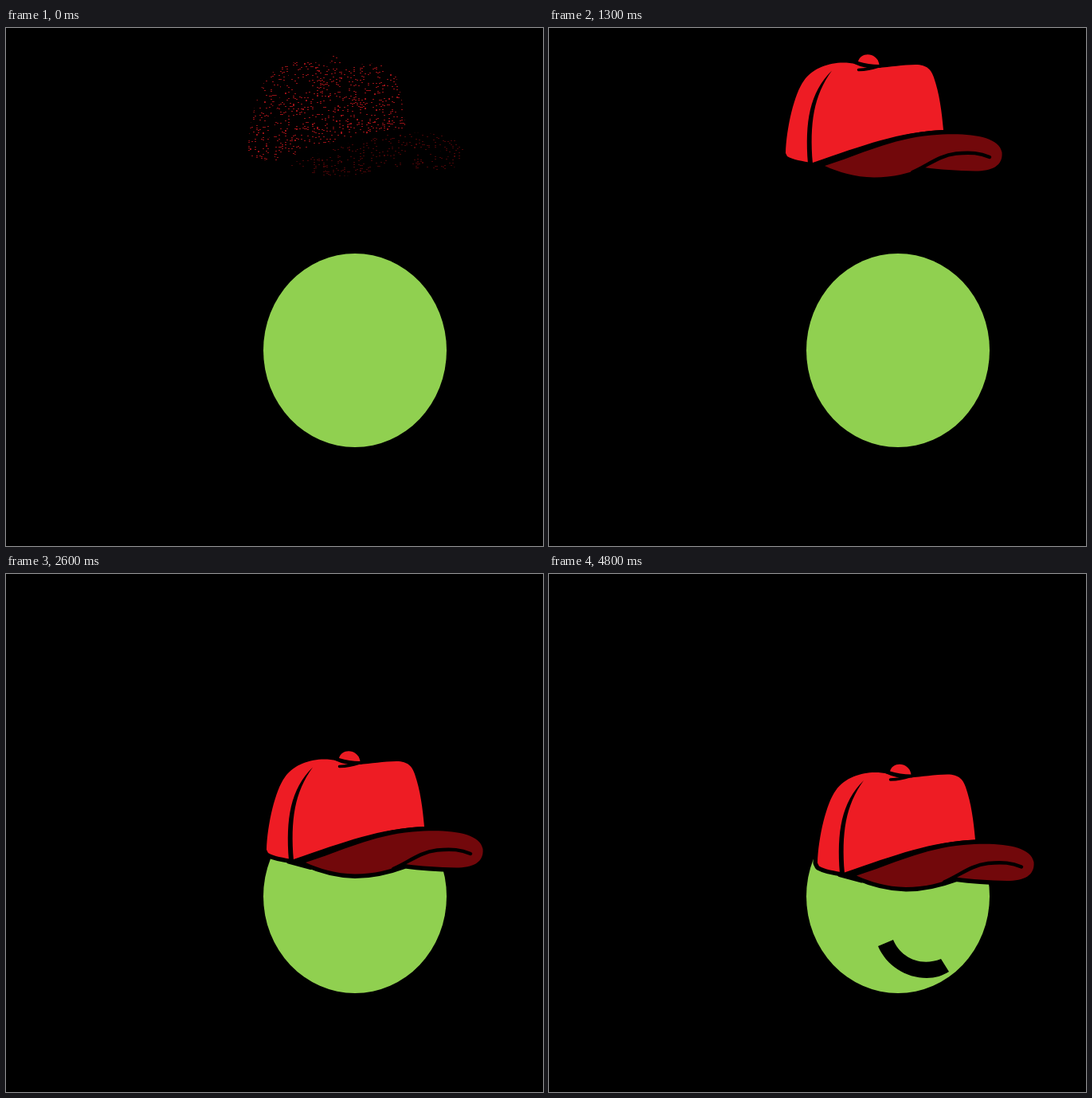
Recreate the animation shown at these times as an HTML page with a canvas. Size 674 px wide and 650 px high, loop 5 s.

```html
<!DOCTYPE html>
<html lang="en">
<head>
<meta charset="utf-8">
<title>Cap and smile</title>
<style>
html, body { margin: 0; width: 100%; height: 100%; overflow: hidden; background: #000; }
canvas { display: block; width: 674px; height: 650px; }
</style>
</head>
<body>
<canvas id="stage" width="674" height="650"></canvas>
<script>
const LOOP = 5000, STEP = 100;
const RED = '#ee1c24', DARK = '#72080b', GREEN = '#90d050';
const ctx = document.getElementById('stage').getContext('2d', { willReadFrequently: true });

const crown = new Path2D('M297 157 C298 125 308 82 320 66 C331 50 352 43.5 369 43.5 C381 43.5 390 46 399 49.5 ' +
  'L413 50 C428 49 444 46 460 46 C475 46 480 53 483 62 C490 82 493 105 495 128 ' +
  'C440 130 395 147 331 169 C318 167.5 306 165 299 161 Z');
const brim = new Path2D('M346 173 C390 159 430 139 480 134.5 C525 131 564 135 568.5 156 ' +
  'C570 173 556 179.5 535 179.5 C512 179 490 177.5 471 175 C452 182 432 187.5 408 187.5 C383 187 364 181 346 173 Z');
const button = new Path2D('M388 42 C391 29.5 412 30 414.5 46 C405 46 397 44.5 388 42 Z');
const seam = new Path2D('M355 53.5 C327 81 321 118 325 170 L331 170 C327 120 332 85 355 53.5 Z');
const fold = new Path2D('M456 181 C475 173 489 160 511 157.5 C530 155.5 541 157 553 162');
const crease = new Path2D('M388.5 52.5 Q402 52 412 48.5 M384 43.5 Q396 49 409 49.5');
const hem = new Path2D('M326 171 L352 178');
const mouth = new Path2D('M413 467 C423 491 448 507 474 507 C485 507 494 504 502 499 ' +
  'L492 483 C464 494 440 479 432 459 Z');

// time, x and y of the cap relative to its drawn place
const moves = [
  [0, 6.5, -1.5], [1100, 6.5, -1.5], [1300, 0, 0], [1500, -85, 27], [1600, -130, 55],
  [1700, -159, 80], [1800, -138, 80], [1900, -138, 80], [2000, -76, 96], [2200, 52, 137],
  [2300, 50, 153], [2400, 45, 167], [2500, 38, 179], [2600, 30, 189], [2700, 30, 197],
  [2800, 34, 203], [2900, 38, 205], [3000, 40, 205.5], [LOOP, 40, 205.5]
];

function capPlace(t) {
  const i = moves.findIndex(m => m[0] > t);
  const [t0, x0, y0] = moves[i - 1], [t1, x1, y1] = moves[i];
  const k = (t - t0) / (t1 - t0);
  return [x0 + (x1 - x0) * k, y0 + (y1 - y0) * k];
}

function strokeLine(path, width) {
  ctx.lineWidth = width;
  ctx.stroke(path);
}

function drawCap(x, y) {
  ctx.save();
  ctx.translate(x, y);
  ctx.strokeStyle = '#000';
  ctx.lineCap = ctx.lineJoin = 'round';
  strokeLine(hem, 8);
  [[crown, RED, 11], [button, RED, 8], [brim, DARK, 11]].forEach(([path, color, width]) => {
    strokeLine(path, width);
    ctx.fillStyle = color;
    ctx.fill(path);
  });
  ctx.fillStyle = '#000';
  ctx.fill(seam);
  strokeLine(fold, 4.5);
  strokeLine(crease, 3.5);
  ctx.restore();
}

function noise(x, y) {
  let h = Math.imul(x + 1, 374761393) ^ Math.imul(y + 1, 668265263);
  h = Math.imul(h ^ (h >>> 13), 1274126177);
  h = Math.imul(h ^ (h >>> 16), 2246822519);
  return ((h ^ (h >>> 15)) >>> 0) / 4294967296;
}

// dim random dashes of the area holding the cap
function dissolve(shown) {
  const x = 290, y = 22, w = 300, h = 180;
  const image = ctx.getImageData(x, y, w, h), data = image.data;
  const bright = 0.6 + 0.4 * shown, dim = 0.4 * shown * shown;
  for (let i = 0; i < w * h; i++) {
    const visible = noise((i % w) >> 1, Math.floor(i / w)) < shown;
    for (let c = 0; c < 3; c++) data[i * 4 + c] *= visible ? bright : dim;
  }
  ctx.putImageData(image, x, y);
}

function draw(t) {
  ctx.fillStyle = '#000';
  ctx.fillRect(0, 0, 674, 650);
  ctx.fillStyle = GREEN;
  ctx.beginPath();
  ctx.ellipse(438, 404.5, 115, 121.5, 0, 0, Math.PI * 2);
  ctx.fill();
  drawCap(...capPlace(t));
  const shown = 0.08 + t / 900;
  if (shown < 1) dissolve(shown);
  if (t >= 3500) {
    ctx.globalAlpha = Math.min(1, (t - 3400) / 200);
    ctx.fillStyle = '#000';
    ctx.fill(mouth);
    ctx.globalAlpha = 1;
  }
}

const start = performance.now();
let last = -1;
function tick() {
  const t = Math.floor(((performance.now() - start) % LOOP) / STEP) * STEP;
  if (t !== last) draw(last = t);
  requestAnimationFrame(tick);
}
tick();
</script>
</body>
</html>
```
